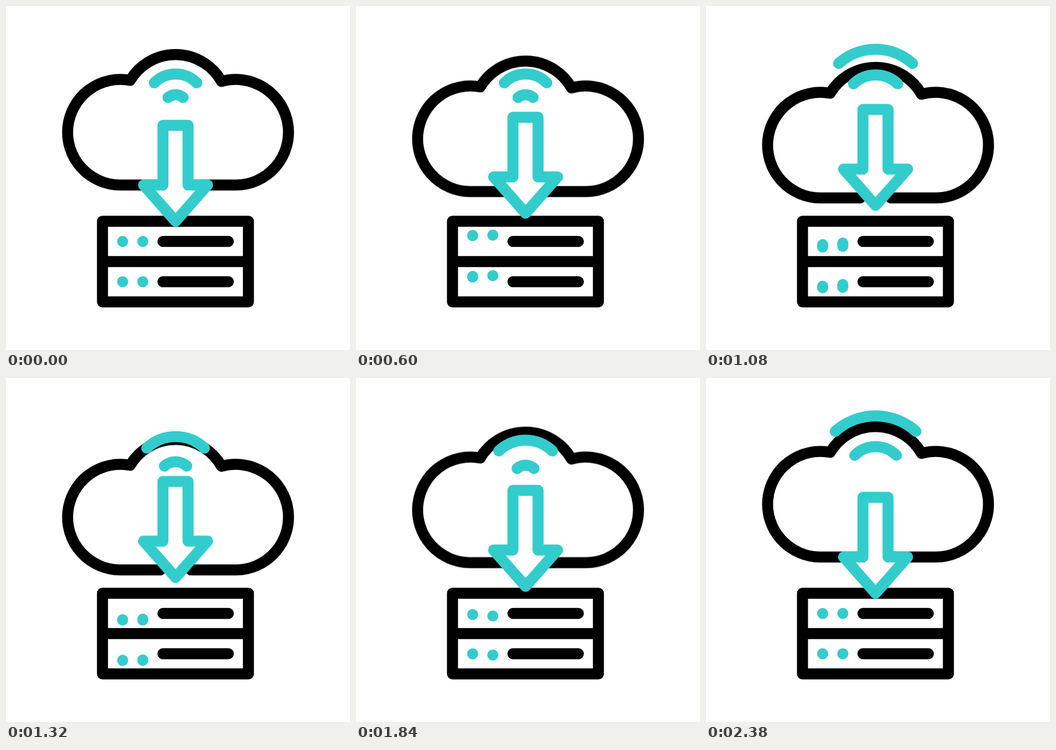
Animation of 640 by 640 pixels, one loop 2.4 s. Source, as an HTML page without scripts:

```html
<!DOCTYPE html>
<html lang="en">
<head>
<meta charset="utf-8">
<title>Cloud download</title>
<style>
  @property --top { syntax: "<length>"; inherits: false; initial-value: 0px; }
  @property --bottom { syntax: "<length>"; inherits: false; initial-value: 0px; }

  html, body { margin: 0; width: 100%; height: 100%; overflow: hidden; background: #fff; }
  svg { display: block; width: 100%; height: 100%; }

  .line {
    fill: none;
    stroke: #000;
    stroke-width: 20.5;
    stroke-linecap: round;
    stroke-linejoin: round;
  }
  .teal { stroke: #33cccc; }

  .cloud, .arrow { animation: bob 2.4s cubic-bezier(.5, 0, .5, 1) infinite; }
  .cloud { --shift: 24.4px; }
  .arrow { --shift: -30px; fill: #fff; }
  @keyframes bob {
    50% { transform: translateY(var(--shift)); }
  }

  /* Four pulses per loop; the middle two of the inner wave reach further. */
  .inner { animation: inner 2.4s linear infinite; }
  .outer { animation: outer 2.4s linear infinite; }
  @keyframes inner {
    0%, 25%, 50%, 75% { d: path("M301.5 170.3A21 21 0 0 1 329.5 170.3"); }
    24.999%, 100% { d: path("M276 143A55.5 55.5 0 0 1 355 143"); }
    49.999%, 74.999% { d: path("M267.5 138.5A69 69 0 0 1 363.5 138.5"); }
  }
  @keyframes outer {
    0%, 25% { d: path("M276 143A55.5 55.5 0 0 1 355 143"); }
    50%, 75% { d: path("M267.5 138.5A69 69 0 0 1 363.5 138.5"); }
    24.999%, 49.999%, 74.999%, 100% { d: path("M239.5 98A114 114 0 0 1 391.5 98"); }
  }

  /* Each end of a light moves on its own, so the light stretches. */
  .lights rect {
    x: -10.25px;
    y: calc(var(--top) - 10.25px);
    width: 20.5px;
    height: calc(var(--bottom) - var(--top) + 20.5px);
    rx: 10.25px;
    fill: #33cccc;
    animation: top-end 2.4s var(--delay) infinite, bottom-end 2.4s var(--delay) infinite;
  }
  @keyframes top-end {
    0% { --top: 0px; animation-timing-function: cubic-bezier(.33, 0, .3, 1); }
    12.5% { --top: -12.2px; }
    15% { --top: -12.2px; animation-timing-function: cubic-bezier(.5, 0, .5, 1); }
    58.33% { --top: 12.4px; }
    61.25% { --top: 12.4px; animation-timing-function: cubic-bezier(.33, 0, .67, 1); }
    77.92%, 100% { --top: 0px; }
  }
  @keyframes bottom-end {
    0% { --bottom: 0px; }
    2.5% { --bottom: 0px; animation-timing-function: cubic-bezier(.5, 0, .5, 1); }
    15.42% { --bottom: -12.2px; animation-timing-function: cubic-bezier(.5, 0, .25, 1); }
    54.17% { --bottom: 12.4px; }
    61.25% { --bottom: 12.4px; animation-timing-function: cubic-bezier(.33, 0, .67, 1); }
    77.92%, 100% { --bottom: 0px; }
  }
</style>
</head>
<body>
<svg viewBox="0 0 640 640">
  <path class="line" d="M179.5 400.5H451V550.5H179.5ZM179.5 475.5H451M292 438H413.7M292 513H413.7"/>
  <g class="lights">
    <rect transform="translate(217 438)" style="--delay: 70ms"/>
    <rect transform="translate(254.5 438)" style="--delay: 140ms"/>
    <rect transform="translate(217 513)" style="--delay: 0ms"/>
    <rect transform="translate(254.5 513)" style="--delay: 85ms"/>
  </g>
  <path class="line cloud" d="M287 333H212A98.2 98.2 0 1 1 231 138.3A98.2 98.2 0 0 1 401 140.2A98.2 98.2 0 1 1 428 333H344"/>
  <path class="line teal outer" d="M276 143A55.5 55.5 0 0 1 355 143"/>
  <path class="line teal inner" d="M301.5 170.3A21 21 0 0 1 329.5 170.3"/>
  <path class="line teal arrow" d="M292 222H338.7V333H375L315.5 400.5L256 333H292Z"/>
</svg>
</body>
</html>
```
